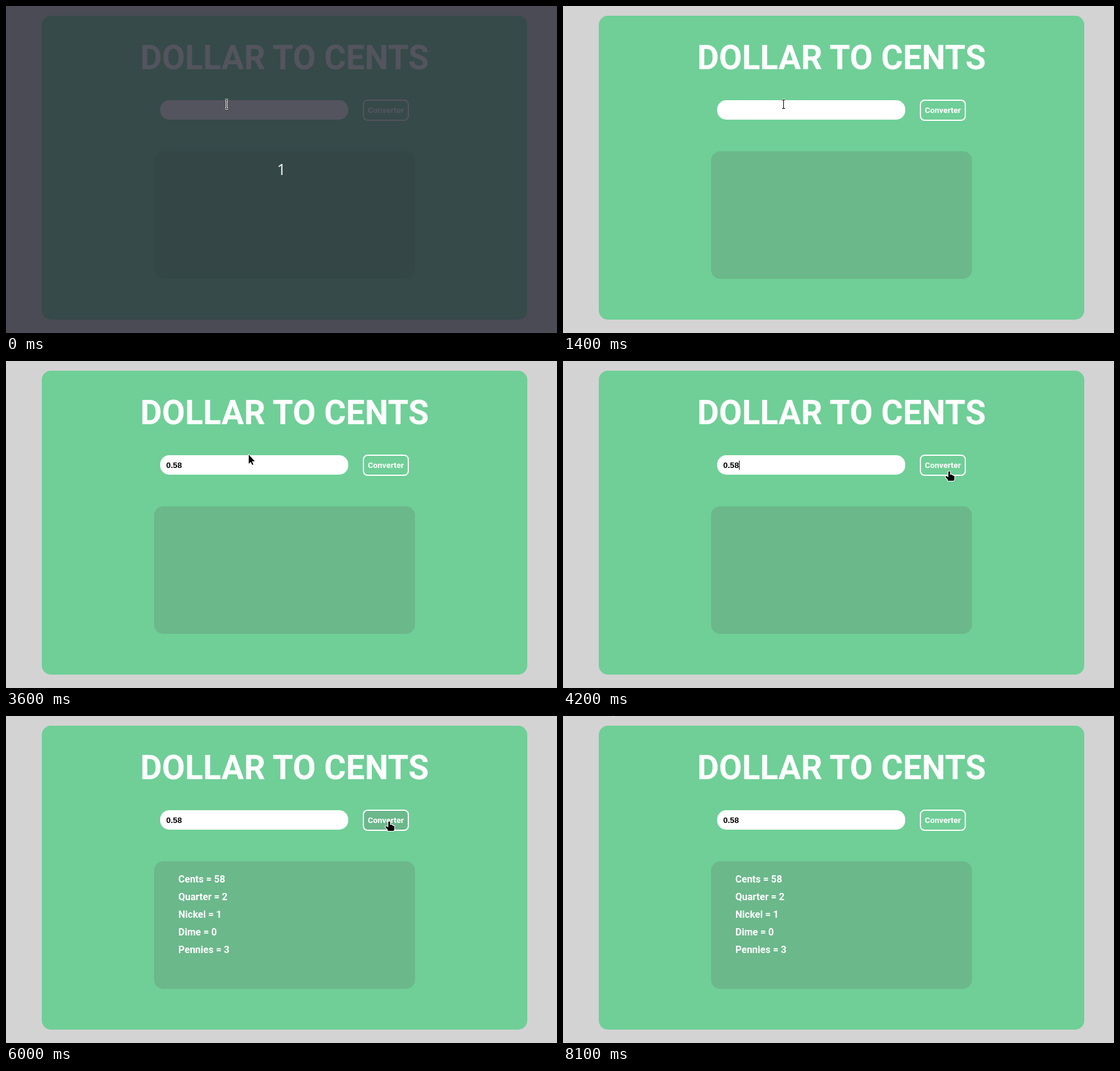
These frames come from a looping animation (908x538 px, 8500 ms). An HTML page:

```html
<!DOCTYPE html>
<html lang="en">
<head>
<meta charset="utf-8">
<title>Dollar to cents</title>
<style>
  html, body { margin: 0; width: 100%; height: 100%; overflow: hidden; background: #d3d3d3; }
  body { position: relative; font: bold 16px Roboto, sans-serif; color: #fff; }
  body > * { position: absolute; box-sizing: border-box; }
  #card { left: 59px; top: 16px; width: 800px; height: 500px; border-radius: 15px; background: #6fcf97; }
  #title { left: 59px; top: 53px; width: 800px; margin: 0; font-size: 55px; line-height: 64px; text-align: center; }
  #field { left: 254px; top: 155px; width: 310px; height: 32px; padding: 9px 10px; border-radius: 15px;
    background: #fff; color: #000; font: bold 13.333px/15px "Liberation Sans", Arial, sans-serif; }
  #caret { position: absolute; top: 9px; width: 1px; height: 15px; background: #000; }
  #button { left: 588px; top: 154px; width: 76px; height: 35px; border: 2px solid; border-radius: 8px;
    font-size: 13.333px; line-height: 31px; text-align: center; white-space: nowrap; }
  #panel { left: 244px; top: 239px; width: 430px; height: 210px; padding: 15px 40px; border-radius: 15px;
    background: #6bb88b; line-height: 29px; }
  #intro { inset: 0; padding-top: 250px; background: rgba(40, 42, 54, .8); color: #f8f8f2;
    font: 26px/36px "Open Sans", sans-serif; text-align: center; }
  #screen { left: 0; top: 0; }
  #pointer path { stroke: #fff; stroke-width: 2; stroke-linejoin: round; paint-order: stroke; }
</style>
</head>
<body>
<div id="card"></div>
<h1 id="title">DOLLAR TO CENTS</h1>
<div id="field"><span id="amount"></span><i id="caret"></i></div>
<div id="button">Converter</div>
<div id="panel"><div id="result">Cents = 58<br>Quarter = 2<br>Nickel = 1<br>Dime = 0<br>Pennies = 3</div></div>
<div id="intro">1</div>
<svg id="screen" width="908" height="538">
  <g id="pointer">
    <g id="beam" fill="none">
      <path d="M-2-6.5H3M-2 7.5H3M.5-6.5V7.5" style="stroke-width: 3"/>
      <path d="M-2-6.5H3M-2 7.5H3M.5-6.5V7.5" style="stroke: #000; stroke-width: 1"/>
    </g>
    <path id="hand" d="M-1 1Q.5 0 2 1V6H5V7H7V8H9V13L8 16H-2V14L-5.5 10V8.5H-3L-1 10.5Z"/>
    <path id="arrow" d="M1 1V16L4.3 13L6.8 18L8.6 17.2L6.4 12H11Z"/>
  </g>
</svg>
<script>
const el = id => document.getElementById(id);
const show = (id, on) => el(id).style.visibility = on ? "visible" : "hidden";
const ramp = (t, from, to) => Math.max(0, Math.min(1, (t - from) / (to - from)));
const easeOut = k => 1 - (1 - k) ** 2;

// a point on a cubic Bezier curve
const curve = (k, ...points) => [0, 1].map(axis => {
  const [a, b, c, d] = points.map(p => p[axis]), m = 1 - k;
  return Math.round(m ** 3 * a + 3 * m * m * k * b + 3 * m * k * k * c + k ** 3 * d);
});
const rest = [363, 161], click = [631, 173], gone = [75, -18];
const locate = t => t < 7000
  ? curve(easeOut(ramp(t, 3500, 4400)), rest, [363, 120], [684, 235], click)
  : curve(ramp(t, 7000, 8100), click, [586, 228], [-86, -9], gone);

const typed = { 1700: "0", 2100: ".", 2600: "58" };
const blinks = [700, 1400, 1700, 3300, 3900, 5000, 5200, 5700];

function draw(t) {
  const [x, y] = locate(t);
  const over = id => {
    const r = el(id).getBoundingClientRect();
    return x >= r.left && x < r.right && y >= r.top && y < r.bottom;
  };
  const kind = over("field") ? "beam" : over("button") ? "hand" : "arrow";
  for (const id of ["beam", "hand", "arrow"]) show(id, id === kind);
  el("pointer").setAttribute("transform", `translate(${x} ${y})`);

  el("amount").textContent = Object.keys(typed).filter(k => k <= t).map(k => typed[k]).join("");
  show("caret", blinks.filter(b => b <= t).length % 2);

  const hover = ramp(t, 4200, 4500) - ramp(t, 7500, 7800);
  el("button").style.background = `rgba(107, 184, 139, ${hover})`;
  show("result", t >= 6000);
  show("intro", t < 100);
}

function tick() {
  draw(Math.floor(performance.now() % 8500 / 100) * 100);
  requestAnimationFrame(tick);
}
tick();
</script>
</body>
</html>
```
